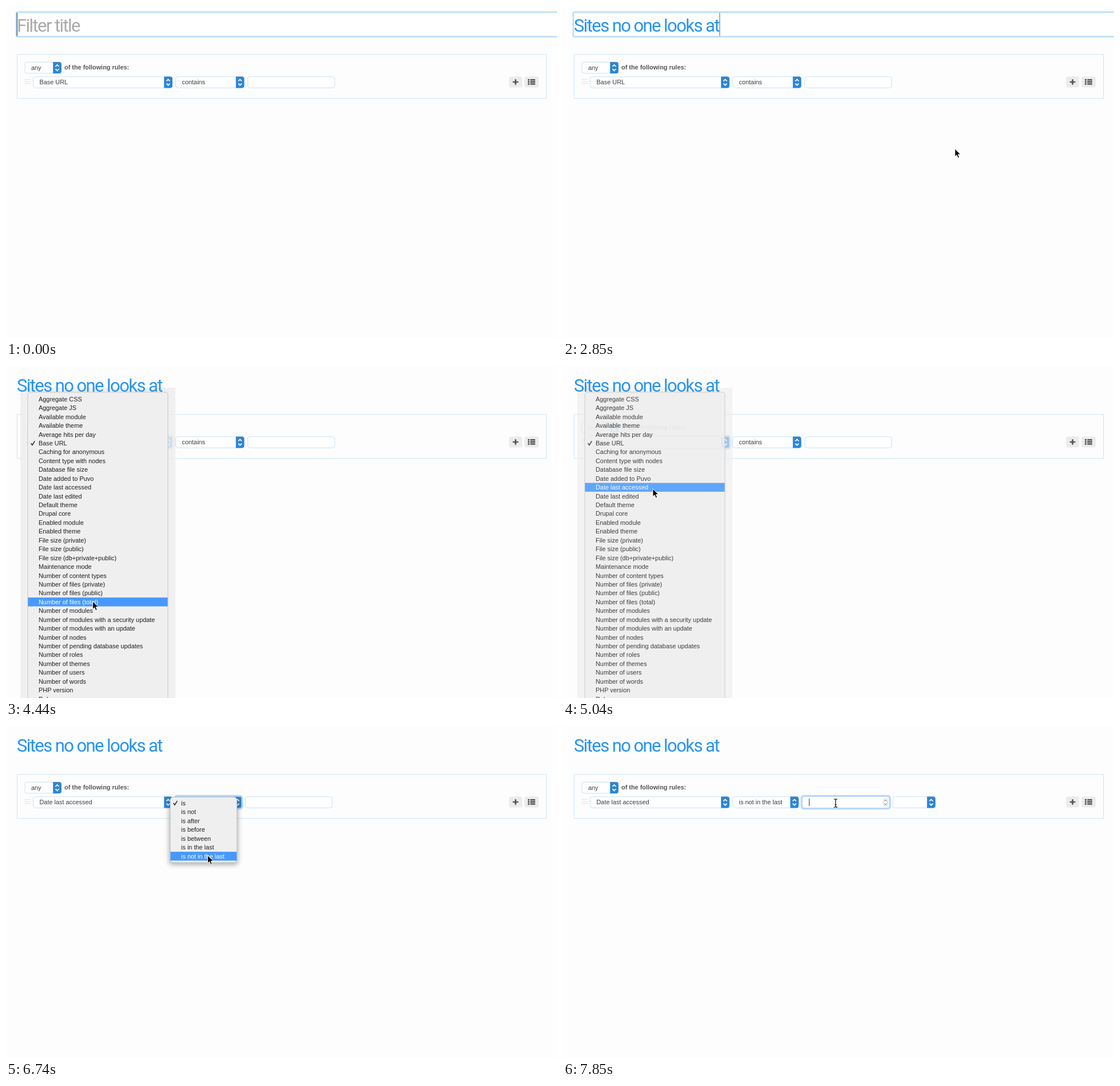
An HTML page for the animation above (8000 ms loop, 963 by 581 pixels).

```html
<!DOCTYPE html>
<html lang="en">
<head>
<meta charset="utf-8">
<title>Filter editor</title>
<style>
  html, body { margin: 0; width: 100%; height: 100%; overflow: hidden; background: #fdfdfd; }
  svg { display: block; font: 10.9px "Liberation Sans", Arial, sans-serif; }
  text { white-space: pre; fill: #3c3c3c; }
  .title { font: 31px Roboto, sans-serif; letter-spacing: -1.58px; fill: #2693f2; }
  .bold { font-weight: bold; fill: #555; }
  .menu text { fill: #1f1f1f; }
  .menu text.on { fill: #fff; }
  .box { fill: #fff; stroke: #c9e1f4; }
  .ring { fill: none; stroke: #b5d9fa; stroke-width: 3; }
</style>
</head>
<body>
<svg id="stage" width="963" height="581" viewBox="0 0 963 581">
  <defs>
    <linearGradient id="cap" x2="0" y2="1">
      <stop stop-color="#3882c6"/><stop offset="1" stop-color="#2588e2"/>
    </linearGradient>
    <filter id="blur" x="-30%" y="-30%" width="160%" height="160%"><feGaussianBlur stdDeviation="4"/></filter>
  </defs>
</svg>
<script>
const LOOP = 8000;
const stage = document.getElementById('stage');

function add(tag, attrs = {}, parent = stage, text) {
  const e = document.createElementNS('http://www.w3.org/2000/svg', tag);
  set(e, attrs);
  if (text) e.textContent = text;
  parent.appendChild(e);
  return e;
}
function set(e, attrs) { for (const k in attrs) e.setAttribute(k, attrs[k]); }
function show(e, on) { e.setAttribute('visibility', on ? 'visible' : 'hidden'); }
function rect(x, y, width, height, attrs, parent) {
  return add('rect', { x, y, width, height, ...attrs }, parent);
}
function label(x, y, s, cls = '', parent) { return add('text', { x, y, class: cls }, parent, s); }

// A drop-down field; resize moves its right end.
function select(x, y, w, s) {
  const g = add('g', { transform: `translate(${x} ${y})` });
  const box = rect(0, 0, w, 19.5, { rx: 4, class: 'box' }, g);
  const cap = add('g', {}, g);
  add('path', { d: 'M-14.3 -.3h10.700a4 4 0 0 1 4 4v12a4 4 0 0 1-4 4h-10.700z', fill: 'url(#cap)' }, cap);
  add('path', {
    d: 'M-10 7.700l3-3 3 3M-10 12l3 3 3-3', fill: 'none', stroke: '#fff', 'stroke-width': 1.7
  }, cap);
  const text = label(11, 13.6, s, '', g);
  const resize = width => {
    set(box, { width });
    set(cap, { transform: `translate(${width} 0)` });
  };
  resize(w);
  return { g, text, resize };
}

function menu(x, y, w, h, textX, first, pitch, checked, items) {
  const g = add('g', { class: 'menu' });
  rect(x, y, w, h, { rx: 5, fill: '#efefef', stroke: '#bcbcbc', 'stroke-width': .8 }, g);
  const bar = rect(x + .4, 0, w - .8, pitch, { fill: '#4799fd' }, g);
  const rows = items.map((s, i) => label(textX, first + i * pitch + 3.9, s, '', g));
  const cy = first + checked * pitch;
  const tick = add('path', {
    d: `M${textX - 13.5} ${cy}l2.4 3.2 4.4-7`, fill: 'none', stroke: '#222', 'stroke-width': 1.5
  }, g);
  return {
    update(alpha, pointerY, lit) {
      show(g, alpha > 0);
      set(g, { opacity: alpha });
      const hot = lit ? Math.round((pointerY - first) / pitch) : -1;
      show(bar, alpha > 0 && hot >= 0);
      set(bar, { y: first + (hot - .5) * pitch });
      rows.forEach((r, i) => set(r, { class: i === hot ? 'on' : '' }));
      set(tick, { stroke: hot === checked ? '#fff' : '#222' });
    }
  };
}

// Form
const titleBox = rect(18, 10.7, 960, 43, { rx: 2, fill: '#fff', stroke: '#b9dcfa', 'stroke-width': 2.6 });
rect(19.5, 84.8, 925, 77, { fill: '#fdfdfd', stroke: '#cfe4f2' });
select(33, 98.2, 63.5, 'any');
label(102, 111, 'of the following rules:', 'bold');
add('path', { d: 'M32.5 128.3h11M32.5 132h11M32.5 135.7h11', stroke: '#dedede' });
const field = select(47.5, 123.7, 243, 'Base URL');
const op = select(296.5, 123.7, 119.5, 'contains');
const input = rect(422.5, 123.7, 152, 19.5, { rx: 4, class: 'box' });
const unit = select(576.5, 123.7, 74, '');
const ring = rect(0, 122.3, 0, 22.4, { rx: 4, class: 'ring' });

const spin = add('g');
rect(560, 127.2, 7.6, 12.8, { rx: 3.5, fill: '#fff', stroke: '#bbb', 'stroke-width': .8 }, spin);
add('path', { d: 'M561.8 131.8l2-2.5 2 2.5M561.8 135.4l2 2.5 2-2.5', fill: 'none', stroke: '#555' }, spin);
const inputCaret = rect(429.8, 127, 1, 13, { fill: '#333' });

rect(879, 123.5, 23, 19, { rx: 4, fill: '#ebebeb' });
add('path', { d: 'M885.8 133h9.6M890.6 128.2v9.6', stroke: '#555', 'stroke-width': 2.6 });
rect(906, 123.5, 25, 19, { rx: 4, fill: '#ebebeb' });
for (const y of [129.3, 132.9, 136.5]) {
  add('path', { d: `M912 ${y}h3M916.3 ${y}h8.6`, stroke: '#555', 'stroke-width': 2.6 });
}

const shade = rect(25, 38, 271, 560, { fill: '#eeeeee' });
const title = label(19, 45, '', 'title');
const caret = rect(0, 12, 1.2, 40.5, {});

const fieldMenu = menu(38, 45.8, 245, 600, 57, 58, 15.43, 5, [
  'Aggregate CSS', 'Aggregate JS', 'Available module', 'Available theme', 'Average hits per day',
  'Base URL', 'Caching for anonymous', 'Content type with nodes', 'Database file size',
  'Date added to Puvo', 'Date last accessed', 'Date last edited', 'Default theme', 'Drupal core',
  'Enabled module', 'Enabled theme', 'File size (private)', 'File size (public)',
  'File size (db+private+public)', 'Maintenance mode', 'Number of content types',
  'Number of files (private)', 'Number of files (public)', 'Number of files (total)',
  'Number of modules', 'Number of modules with a security update',
  'Number of modules with an update', 'Number of nodes', 'Number of pending database updates',
  'Number of roles', 'Number of themes', 'Number of users', 'Number of words', 'PHP version', 'Role'
]);
const opShade = rect(285, 128, 120.5, 115, { rx: 6, fill: '#000', filter: 'url(#blur)' });
const opMenu = menu(287, 124.5, 116.5, 114.5, 306, 135, 15.47, 0, [
  'is', 'is not', 'is after', 'is before', 'is between', 'is in the last', 'is not in the last'
]);

// Pointers, each with its hot spot at 0,0
const pointer = add('g');
const shapes = {
  arrow: add('path', {
    d: 'M0 0v13.6l3.1-2.9 2.2 5.1 2.3-1-2.2-5h4.4z', fill: '#000', stroke: '#fff', 'stroke-width': .9
  }, pointer),
  hand: add('path', {
    d: 'M-2-.5c1.3-1.2 2.3-.2 2.6 1l1 4.2c.8-.8 2-.7 2.4.2.9-.6 2-.4 2.3.6 1-.4 1.9.1 2 1.2v3.3' +
       'c0 1.5-1.2 2.6-1.2 3.6v1.8h-6.6v-1.3c-1.8-1.2-3.3-3.4-5-5.4-.8-1.3.8-2.3 2-1.3l1.6 1.4' +
       '-2-7.6c-.1-.8.2-1.3.9-1.7zM2 9.2v3M4.2 9v3M6.2 9v3',
    fill: '#fff', stroke: '#000', 'stroke-width': 1.1, 'stroke-linejoin': 'round'
  }, pointer),
  beam: add('path', {
    d: 'M-3-6.5q3 0 3 2 0-2 3-2M0-4.5v11M-3 8q3 0 3-2 0 2 3 2M-1.8 3.2h3.6',
    fill: 'none', stroke: '#111', 'stroke-width': 1.2
  }, pointer)
};

// Timeline
const NAME = 'Sites no one looks at';
const run = (from, step, n) => Array.from({ length: n }, (_, i) => from + i * step);
const keys = [600, ...run(780, 80, 7), 1430, 1520, 1610, 1730, 1790, 1850, ...run(2020, 96, 6), 2680];
const track = [
  [2850, 685, 250], [3550, 173.5, 139.5], [4150, 173.5, 139.5], [4360, 150, 471], [4620, 157, 215],
  [5240, 157, 215], [5500, 350, 143], [5740, 350, 143], [5800, 359.3, 140.2], [6330, 359.3, 140.2],
  [6740, 352.5, 226.5], [7160, 352.5, 226.5], [7490, 476.5, 134.3]
];

function pointerAt(t) {
  const i = track.findIndex(k => k[0] > t);
  if (i < 0) return track[track.length - 1].slice(1);
  if (!i) return track[0].slice(1);
  const [a, b] = [track[i - 1], track[i]];
  const u = (t - a[0]) / (b[0] - a[0]);
  const e = u * u * (3 - 2 * u);
  return [a[1] + (b[1] - a[1]) * e, a[2] + (b[2] - a[2]) * e];
}

// Open until the click, one blink of the bar, then a stepped fade.
function menuState(t, open, click) {
  if (t < open) return [0, false];
  if (t < click + 120) return [1, t < click || t >= click + 60];
  const a = .85 - .25 * Math.floor((t - click - 120) / 60);
  return [a > .05 ? a : 0, true];
}

function render(t) {
  const n = keys.filter(k => k <= t).length;
  const empty = n === 0;
  title.textContent = empty ? 'Filter title' : NAME.slice(0, n);
  title.style.fill = empty ? '#a9a9a9' : '';
  const end = empty ? 18.8 : 19.5 + title.getComputedTextLength();
  set(caret, { x: end, fill: empty ? '#456' : '#3d8fd6' });
  show(caret, t < 480 || (t >= 600 && t < 3180));
  show(titleBox, t < 3670);

  const dated = t >= 5220, ranged = t >= 7220;
  field.text.textContent = dated ? 'Date last accessed' : 'Base URL';
  op.text.textContent = ranged ? 'is not in the last' : dated ? 'is' : 'contains';
  op.resize(dated ? 115 : 119.5);
  set(input, { x: dated ? 418.2 : 422.5 });
  show(unit.g, ranged);
  show(spin, ranged);
  show(inputCaret, t >= 7850);

  const [rx, rw] = t < 5970 ? [46, 246] : t < 7850 ? [295, 118] : [417, 154.5];
  set(ring, { x: rx, width: rw });
  show(ring, t >= 3670);

  const [x, y] = pointerAt(t);
  const [a1, lit1] = menuState(t, 3610, 4920);
  const [a2, lit2] = menuState(t, 5920, 6920);
  fieldMenu.update(a1, y, lit1);
  opMenu.update(a2, y, lit2);
  set(shade, { opacity: a1 * a1 * .85 });
  set(opShade, { opacity: a2 * .3 });

  const overRow = Math.abs(y - 136) < 10 && !a1 && !a2;
  const kind = overRow && x > 417 && x < 571 ? 'beam' : overRow && x > 47 && x < 413 ? 'hand' : 'arrow';
  const on = t >= 2850;
  for (const k in shapes) show(shapes[k], on && k === kind);
  set(pointer, { transform: `translate(${x} ${y})` });
}

const start = performance.now();
function tick() {
  render((performance.now() - start) % LOOP);
  requestAnimationFrame(tick);
}
tick();
</script>
</body>
</html>
```
